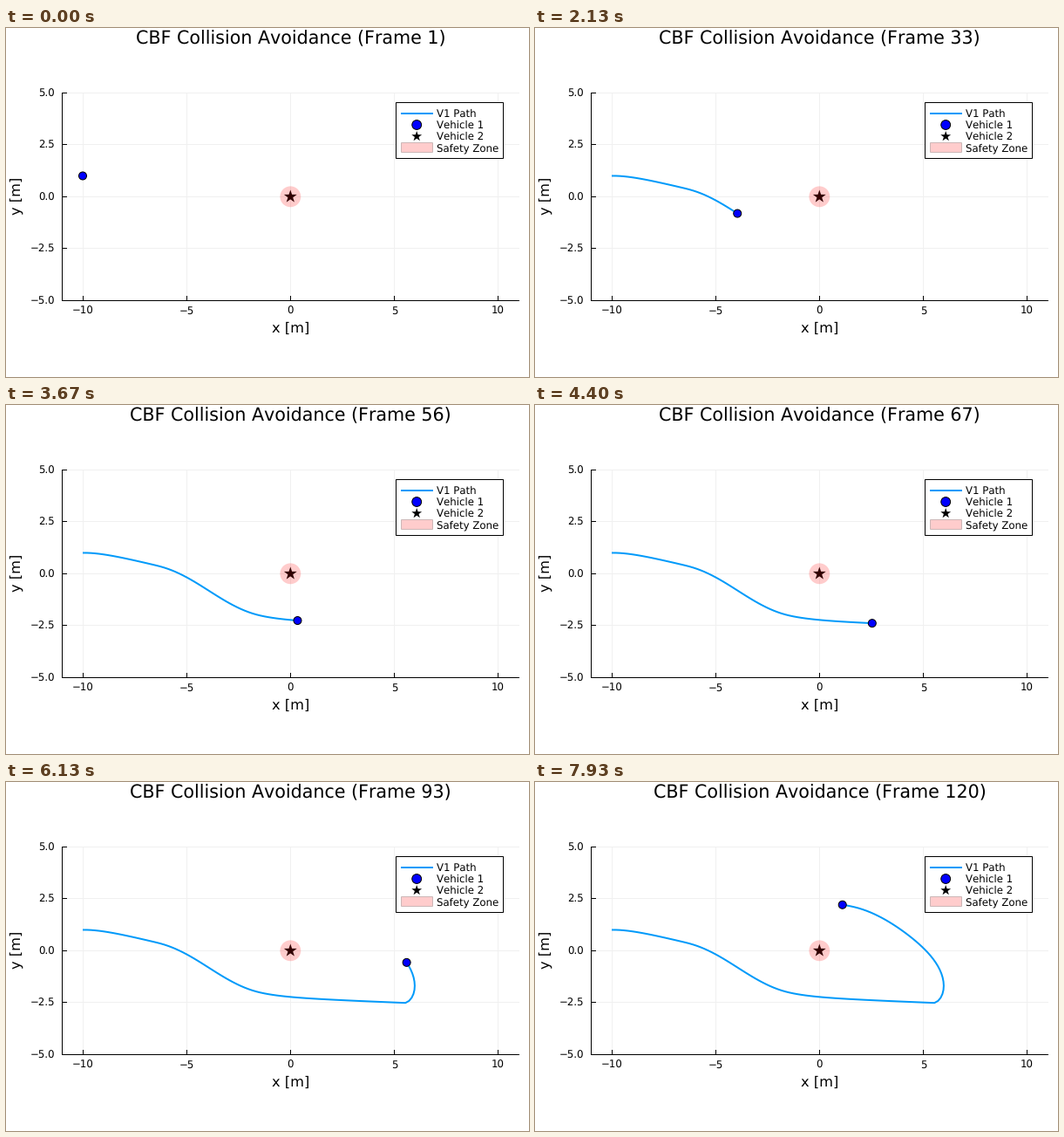
Animation, 600 px wide and 400 px high, one loop 8000 ms. Source, as a matplotlib script:

```python
import numpy as np
import matplotlib.pyplot as plt
from matplotlib.animation import FuncAnimation
from matplotlib.patches import Circle, Polygon, Rectangle

plt.rcParams["font.family"] = "DejaVu Sans"
plt.rcParams["text.hinting"] = "none"
plt.rcParams["text.kerning_factor"] = 6     # no pair kerning

W, H, DPI = 600, 400, 100
TICKS, LOOP_MS, DRAW_MS = 120, 8000, 20
PX = 72 / DPI                   # points per pixel
X0, Y0, UNIT = 326.3, 193.3, 23.83
LEFT, RIGHT, TOP, BOTTOM = 64.2, 588.4, 74.2, 312.4
SKY, RED = "#009afa", (1, 0, 0, 0.2)

# the drive: constant speed, steered to one goal and then to the other
DT, SPEED, GAIN, MARGIN = 0.1, 2.0, 2.0, 0.83
GOALS, SWITCH = np.array([(5.5, -2.51), (-5, 2.5)]), 80


def steer(p, heading, goal):
    """Turn rate towards the goal, limited by a barrier around the origin."""
    ahead = np.array([np.cos(heading), np.sin(heading)])
    side = np.array([-ahead[1], ahead[0]])
    error = np.arctan2(*(goal - p)[::-1]) - heading
    rate = GAIN * ((error + np.pi) % (2 * np.pi) - np.pi)
    # h'' + 2h' + h >= 0 for h = |p|^2 - MARGIN^2
    slack = 2 * SPEED**2 + 4 * SPEED * (p @ ahead) + p @ p - MARGIN**2
    lever = 2 * SPEED * (p @ side)
    if slack + lever * rate < 0:
        rate = -slack / lever
    return rate, ahead


def drive():
    p, heading, track = np.array([-10.0, 1.0]), 0.0, []
    for n in range(TICKS):
        track.append(p)
        rate, ahead = steer(p, heading, GOALS[int(n >= SWITCH)])
        p = p + DT * SPEED * ahead
        heading += DT * rate
    return np.array(track)


def sx(x):
    return X0 + UNIT * x


def sy(y):
    return Y0 - UNIT * y


fig = plt.figure(figsize=(W / DPI, H / DPI), dpi=DPI, facecolor="white")
ax = fig.add_axes([0, 0, 1, 1])
ax.set_xlim(0, W)
ax.set_ylim(H, 0)
ax.axis("off")


def line(xs, ys, width=1, color="black", z=2, **kw):
    return ax.plot(xs, ys, color=color, lw=width * PX, zorder=z, **kw)[0]


def text(x, y, s, size, ha="center", **kw):
    return ax.text(x, y, s, fontsize=size * PX, ha=ha, va="baseline", zorder=9, **kw)


def dot(x, y, r, z):
    return ax.add_patch(Circle((x, y), r, fc="blue", ec="black", lw=PX, zorder=z))


def star(x, y, r, z):
    a = -np.pi / 2 + np.arange(10) * np.pi / 5
    rad = np.where(np.arange(10) % 2, 0.39 * r, r)
    pts = np.column_stack([x + rad * np.cos(a), y + rad * np.sin(a)])
    ax.add_patch(Polygon(pts, fc="black", ec="none", zorder=z))


def label(v, form):
    return format(v, form).replace("-", "\u2212")


# axes, grid and labels; straight lines sit on the pixel below
for i in range(-2, 3):
    gx, gy = sx(5 * i) - 0.45, sy(2.5 * i) - 0.45
    line([gx, gx], [TOP, BOTTOM], 1, "#f0f0f0", 1)
    line([LEFT, RIGHT], [gy, gy], 1, "#f0f0f0", 1)
    line([gx, gx], [BOTTOM - 5, BOTTOM])
    line([LEFT, LEFT + 5], [gy, gy])
    text(sx(5 * i), 328.3, label(5 * i, "d"), 11.8)
    text(56.2, sy(2.5 * i) + 4.4, label(2.5 * i, ".1f"), 11.8, "right")
line([LEFT, LEFT, RIGHT], [TOP, BOTTOM, BOTTOM])
text(X0 + 0.3, 348.4, "x [m]", 16.2)
text(17, Y0 - 0.6, "y [m]", 16.2, rotation=90, rotation_mode="anchor")
title = text(X0 + 0.5, 18.3, "", 20.6)

# parked vehicle under its safety zone
star(sx(0), sy(0), 7.8, 4)
ax.add_patch(Circle((sx(0), sy(0)), 0.5 * UNIT, fc=RED, ec="none", zorder=5))

# legend
ax.add_patch(Rectangle((447, 85), 123, 64, fc="white", ec="black", lw=PX, zorder=6))
line([453, 489.5], [98] * 2, 2, SKY, 7, solid_capstyle="butt")
dot(471.2, 111, 5.4, 7)
star(471.2, 124.2, 6.2, 7)
ax.add_patch(Rectangle((453, 131), 36, 11, fc=RED, ec=(0, 0, 0, 0.2), lw=PX, zorder=7))
for i, name in enumerate(("V1 Path", "Vehicle 1", "Vehicle 2", "Safety Zone")):
    text(493.8, 102 + 13 * i, name, 11.8, "left")

# moving vehicle and its trail
tx, ty = np.array([sx(0), sy(0)])[:, None] + UNIT * drive().T * [[1], [-1]]
trail = line([], [], 2, SKY, 3, solid_capstyle="butt", solid_joinstyle="round")
car = dot(tx[0], ty[0], 4.5, 5)


def draw(i):
    # the picture steps on a 10 ms clock, slightly ahead of the exact tick
    n = int((i * DRAW_MS + 14) * TICKS / LOOP_MS)
    trail.set_data(tx[:n + 1], ty[:n + 1])
    trail.set_visible(n > 0)
    car.center = (tx[n], ty[n])
    title.set_text(f"CBF Collision Avoidance (Frame {n + 1})")
    return trail, car, title


anim = FuncAnimation(fig, draw, frames=LOOP_MS // DRAW_MS, init_func=lambda: draw(0),
                     interval=DRAW_MS, repeat=True, repeat_delay=0)
plt.show()
```
